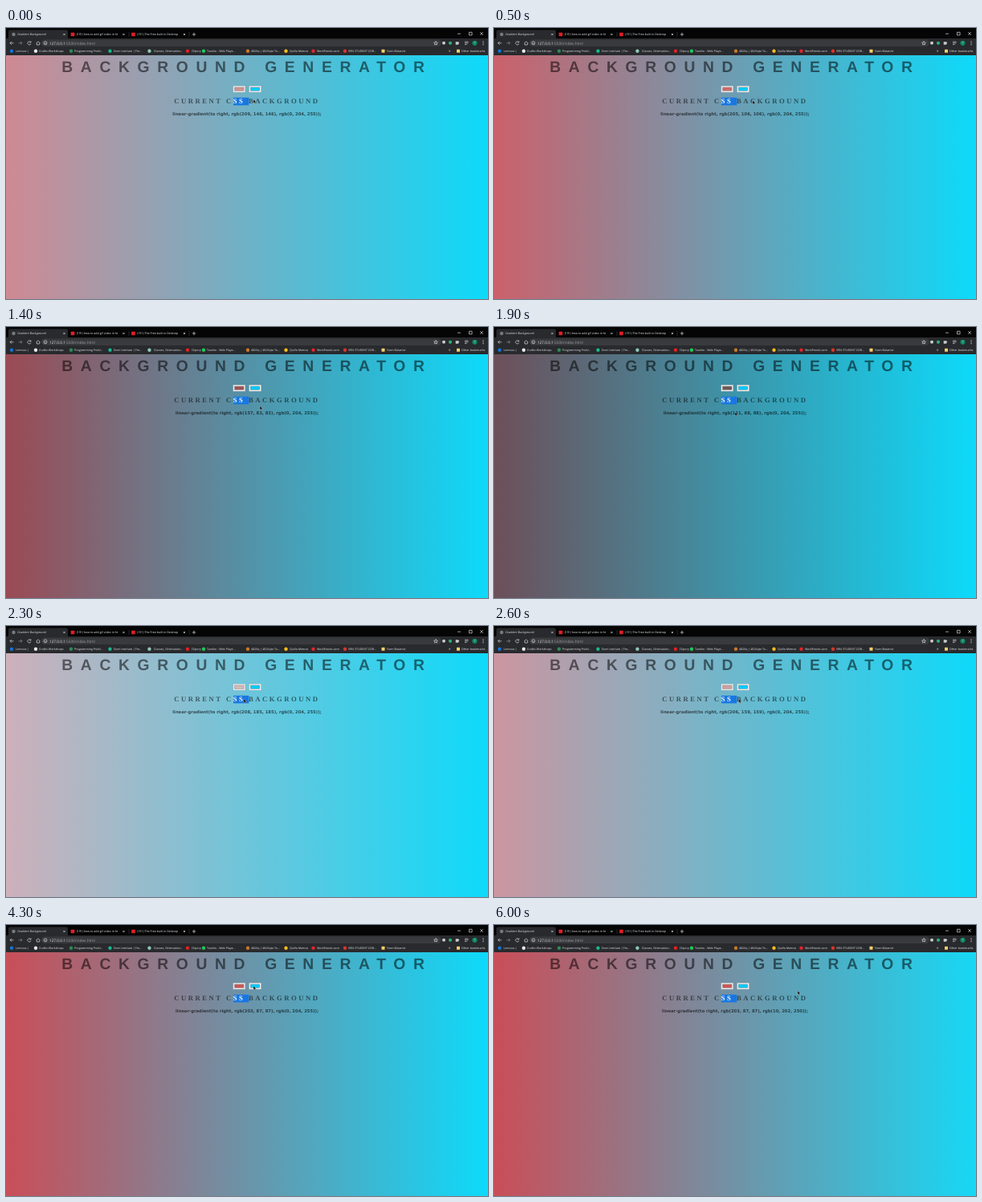
An HTML page for the animation above (6.1 s loop, 600 by 338 pixels).

```html
<!DOCTYPE html>
<html lang="en">
<head>
<meta charset="utf-8">
<title>Gradient Background</title>
<style>
html, body { margin: 0; width: 100%; height: 100%; overflow: hidden; background: #000; }
svg { display: block; width: 600px; height: 338px; }
text { text-rendering: geometricPrecision; white-space: pre; }
.ui { font: 3.6px "Open Sans", "Noto Sans", sans-serif; fill: #e8eaed; }
.title { font: bold 19.3px "Liberation Sans", Arial, sans-serif; letter-spacing: 9.65px; }
.sub { font: bold 8.67px "Liberation Serif", "Times New Roman", serif; letter-spacing: 2.49px; }
.css { font: bold 5.28px "DejaVu Sans", Verdana, sans-serif; text-anchor: middle; }
.ink { fill: rgba(0, 0, 0, .53); }
.line { fill: none; stroke: #d5d7da; stroke-width: .7; }
</style>
</head>
<body>
<svg viewBox="0 0 600 338" xmlns="http://www.w3.org/2000/svg">
  <defs>
    <linearGradient id="grad">
      <stop id="stopA" offset="0"/>
      <stop id="stopB" offset="1"/>
    </linearGradient>
  </defs>
  <rect y="34" width="600" height="304" fill="url(#grad)"/>

  <rect width="600" height="14" fill="#050506"/>
  <path d="M1 13.5Q3 13.5 3 11V4.5Q3 2.5 5 2.5H75Q77 2.5 77 4.5V11Q77 13.5 79 13.5Z" fill="#292a2d"/>
  <rect y="13" width="600" height="21" fill="#292a2d"/>
  <rect x="44" y="14.6" width="498" height="8.4" rx="4.2" fill="#393a3d"/>
  <g id="chrome"></g>

  <text class="title ink" x="69.3" y="54.5">BACKGROUND GENERATOR</text>
  <g id="pickers"></g>
  <rect x="283" y="86.8" width="19.3" height="9.6" fill="#1877e2"/>
  <text class="sub ink" x="209.3" y="94.1">CURRENT C<tspan fill="#fff">SS</tspan> BACKGROUND</text>
  <text id="css" class="css" x="300" y="109.3" fill="rgba(0,0,0,.6)"></text>
  <path id="mouse" d="M0 0V4.8L1.1 3.8L1.9 5.5L2.7 5.1L2 3.5H3.5Z" fill="#111" stroke="#ddd" stroke-width=".3"/>
</svg>
<script>
const $ = id => document.getElementById(id);
const LOOP = 6100, STEP = 100;

const dot = (x, y, r, fill) => `<circle cx="${x}" cy="${y}" r="${r}" fill="${fill}"/>`;
const label = (x, y, s, extra = "") => `<text class="ui" x="${x}" y="${y}" ${extra}>${s}</text>`;
const stroke = d => `<path class="line" d="${d}"/>`;
const cross = (x, y, r) => stroke(`M${x - r} ${y - r}L${x + r} ${y + r}M${x + r} ${y - r}L${x - r} ${y + r}`);
const square = (x, y, s, fill) => `<rect x="${x - s / 2}" y="${y - s / 2}" width="${s}" height="${s}" rx=".5" fill="${fill}"/>`;

const tabs = [
  [9.5, "#777a7e", "Gradient Background", 72.5],
  [83, "#e01f26", "(191) how to add gif video in ht", 146.5],
  [158.5, "#e01f26", "(191) The Free built in Desktop", 222]
];

// icon x, icon colour, text x, text
const marks = [
  [7, "#1672d4", 12, "Lernova |"],
  [37, "#e8e8e8", 41, "Craftix Workshops"],
  [81, "#2e8b57", 85, "Programming Probl..."],
  [129.5, "#17b890", 134, "Dorn Institute | Fre..."],
  [178.5, "#8fc7b5", 184, "Classes, Orientation..."],
  [226, "#e01f26", 231, "Clipory"],
  [246, "#1fc75b", 250, "Tunelio - Web Playe..."],
  [301, "#c9792b", 305, "4826q | 4826qto To..."],
  [348.5, "#f5bd1e", 353, "Quillo Memos"],
  [382.5, "#e3242b", 387, "WorkPondo.com"],
  [422, "#d8352c", 426, "VRN STUDENT COR..."],
  [469.5, "#f3cf6b", 474, "Farm Botanist"],
  [563, "#f3cf6b", 567, "Other bookmarks"]
];

function buildChrome() {
  let s = tabs.map(([x, c, name, end], i) =>
    (i ? square(x, 8, 4.6, c) : dot(x, 8, 2.2, c)) +
    label(x + 4.7, 9.3, name) + cross(end, 8, 1.1)).join("");
  s += stroke("M231.8 8H236.2M234 5.8V10.2");
  s += `<path d="M153 5V11M228 5V11" stroke="#4a4b4e" stroke-width=".5"/>`;
  s += stroke("M562 7.2H566M576.5 5.3H580.1V8.9H576.5Z") + cross(592, 7, 1.8);
  s += stroke("M9.5 18.8H5M7 16.8L5 18.8L7 20.8");
  s += `<g opacity=".55">${stroke("M15.5 18.8H20M18 16.8L20 18.8L18 20.8")}</g>`;
  s += stroke("M30.5 17.5A2.1 2.1 0 1 0 31 19.5M31 16.4V18H29.3");
  s += stroke("M37.5 19L40 16.8L42.5 19M38.3 18.6V21H41.7V18.6");
  s += stroke("M51 18.8A2 2 0 1 1 47 18.8A2 2 0 1 1 51 18.8M49 18.4V20");
  s += label(54, 20.5, `127.0.0.1<tspan fill="#9ba0a5">:5500/index.html</tspan>`, `style="font-size:4.7px"`);
  s += stroke("M535 16.5L535.7 18.2L537.4 18.3L536.1 19.4L536.5 21L535 20.1L533.5 21L533.9 19.4L532.6 18.3L534.3 18.2Z");
  s += dot(545, 18.8, 2, "#c8cacc") + dot(553, 18.8, 2.1, "#2fae78");
  s += square(561.5, 19, 3.6, "#c8cacc") + dot(563.4, 18.6, .8, "#c8cacc");
  s += stroke("M571 17.2H575.5M571 18.9H575.5M571 20.6H573.5");
  s += dot(583.5, 18.8, 3.1, "#0b8a62") + label(582.6, 20, "T");
  s += [16.9, 18.8, 20.7].map(y => dot(594, y, .6, "#d5d7da")).join("");
  s += marks.map(([x, c, tx, name], i) =>
    (i > 10 ? square(x, 28.8, 4, c) : dot(x, 28.8, 2.2, c)) + label(tx, 30, name)).join("");
  s += label(551, 30, "»", `style="font-size:5px"`);
  $("chrome").innerHTML = s;
}

function buildPickers() {
  $("pickers").innerHTML = [["A", 282.8], ["B", 302.6]].map(([id, x]) =>
    `<rect x="${x}" y="72.2" width="15" height="7.9" fill="#efefef" stroke="#9a9da0" stroke-width=".3"/>
     <rect id="swatch${id}" x="${x + 1.8}" y="74" width="11.4" height="4.3" stroke="#777" stroke-width=".4"/>`).join("");
}

// keys: time, then values
const leftKeys = [
  [0, 209, 146, 146], [900, 202, 78, 78], [1900, 111, 88, 88],
  [2300, 208, 185, 185], [3200, 200, 86, 86], [3500, 203, 87, 87]
];
const rightKeys = [[4300, 0, 204, 255], [5900, 10, 202, 250]];
const mouseKeys = [
  [0, 308, 89], [900, 332, 91], [1900, 300, 106], [2300, 296, 91], [3200, 329, 91],
  [3500, 340, 94], [3900, 461, 104], [4300, 308, 76], [5000, 340, 92], [6000, 378, 82]
];

function at(keys, t) {
  const i = keys.findIndex(k => k[0] > t);
  if (i === 0) return keys[0].slice(1);
  if (i < 0) return keys[keys.length - 1].slice(1);
  const a = keys[i - 1], b = keys[i];
  const u = (t - a[0]) / (b[0] - a[0]), e = u * u * (3 - 2 * u);
  return a.slice(1).map((v, n) => v + (b[n + 1] - v) * e);
}

const rgb = c => `rgb(${c.join(", ")})`;

function draw(t) {
  const left = at(leftKeys, t).map(Math.round);
  const right = at(rightKeys, t).map(Math.round);
  const [x, y] = at(mouseKeys, t);
  // the page appears in slightly shifted tones
  $("stopA").setAttribute("stop-color", rgb([left[0] - 2, left[1] - 9, left[2] + 1]));
  $("stopB").setAttribute("stop-color", rgb([right[0] + 13, right[1] + 14, right[2] - 5]));
  $("swatchA").setAttribute("fill", rgb(left));
  $("swatchB").setAttribute("fill", rgb(right));
  $("css").textContent = `linear-gradient(to right, ${rgb(left)}, ${rgb(right)});`;
  $("mouse").setAttribute("transform", `translate(${x.toFixed(1)} ${y.toFixed(1)})`);
}

function tick() {
  const t = performance.now() % LOOP;
  draw(Math.floor(t / STEP) * STEP);
  requestAnimationFrame(tick);
}

buildChrome();
buildPickers();
tick();
</script>
</body>
</html>
```
